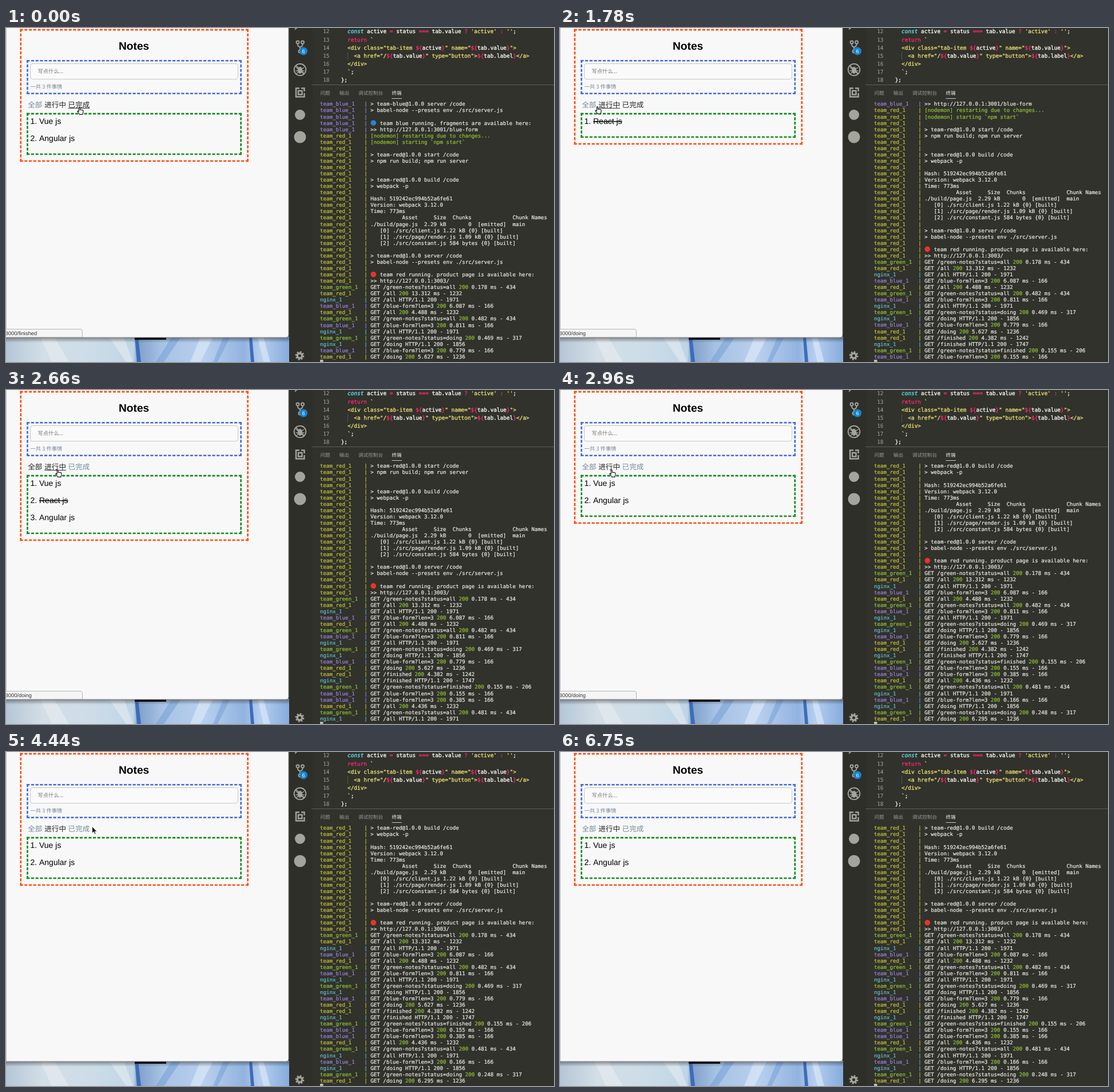
An HTML page for the animation above (6.85 s loop, 958 by 585 pixels).

```html
<!DOCTYPE html>
<html lang="zh">
<head>
<meta charset="utf-8">
<title>Notes</title>
<style>
html, body { margin: 0; width: 100%; height: 100%; overflow: hidden; background: #31322b; }
svg { display: block; }
text { white-space: pre; text-rendering: geometricPrecision; }
.sans { font-family: "Liberation Sans", Arial, sans-serif; }
.cjk { font-family: "Noto Sans CJK SC", "Noto Sans CJK", sans-serif; }
.mono { font-family: "DejaVu Sans Mono", monospace; fill: currentColor; stroke: currentColor; }
.mono tspan { fill: currentColor; stroke: currentColor; }
#code { font-size: 9.43px; color: #f8f8f2; stroke-width: .35px; }
#nums { font-size: 9.43px; color: #9a9a93; stroke-width: .1px; }
#code .p { color: #f92672; }
#code .y { color: #e6db74; }
#code .c { color: #66d9ef; font-style: italic; }
#rows { font-size: 9.17px; color: #ecece6; stroke-width: .22px; }
#rows text { fill: currentColor; stroke: currentColor; }
#rows .B { color: #9a80dc; }
#rows .R { color: #c3c23c; }
#rows .G { color: #93c13a; }
#rows .N { color: #64bccd; }
#tabs { font-size: 12.6px; }
#items { font-size: 14px; fill: #000; }
#icons { fill: none; stroke: #a3a49c; stroke-width: 1.9; }
</style>
</head>
<body>
<svg width="958" height="585" viewBox="0 0 958 585">
  <defs>
    <linearGradient id="sky">
      <stop offset="0" stop-color="#b4c6d6"/><stop offset=".13" stop-color="#d3dee6"/>
      <stop offset=".3" stop-color="#cddde8"/><stop offset=".45" stop-color="#bfd5e6"/>
      <stop offset=".465" stop-color="#7f9fcb"/><stop offset=".55" stop-color="#a6c2e4"/>
      <stop offset=".7" stop-color="#b9d0ee"/><stop offset=".84" stop-color="#92b3e0"/>
      <stop offset=".9" stop-color="#b5cff0"/><stop offset="1" stop-color="#86abdc"/>
    </linearGradient>
    <linearGradient id="shade" x2="0" y2="1">
      <stop offset="0" stop-color="#333" stop-opacity=".5"/><stop offset="1" stop-color="#333" stop-opacity="0"/>
    </linearGradient>
    <clipPath id="term"><rect x="536" y="128" width="422" height="453"/></clipPath>
  </defs>

  <rect width="958" height="585" fill="#31322b"/>
  <rect x="494" width="42" height="585" fill="#2e2f29"/>

  <!-- desktop -->
  <rect y="541" width="495" height="44" fill="url(#sky)"/>
  <path d="M60 541L80 585H110L84 541zM180 541L210 585H222L206 541z" fill="#eef2f4" opacity=".5"/>
  <path d="M225 541H231L236 585H229zM425 541H430L434 585H428z" fill="#3d6cb8"/>
  <path d="M290 541L262 585H276L306 541zM380 541L362 585H370L392 541z" fill="#5b8acb" opacity=".35"/>
  <path d="M340 541L322 585H340L362 541zM440 541L450 585H462L450 541z" fill="#e1edfb" opacity=".6"/>
  <rect y="542" width="495" height="9" fill="url(#shade)"/>
  <rect x="225" y="541" width="55" height="5" fill="#0c0d10"/>

  <!-- browser page -->
  <path d="M0-2H494V538Q494 542 490 542H0z" fill="#f8f8f8" stroke="#85878a" stroke-width="1"/>
  <g id="boxes" fill="none" stroke-width="2.6"></g>
  <text class="sans" x="223.6" y="38" font-size="19.2" font-weight="700" text-anchor="middle">Notes</text>
  <rect x="42.5" y="62.5" width="363" height="27.2" rx="4" fill="#fafafa" stroke="#c6c6c6"/>
  <text class="cjk" x="55.5" y="79.3" font-size="9.3" fill="#757575">写点什么...</text>
  <text class="cjk" x="42.5" y="106.4" font-size="9.3" fill="#778899">一共 3 件事情</text>
  <g id="tabs" class="cjk"></g>
  <g id="items" class="sans"></g>
  <g id="bubble">
    <path d="M-2 527.5H130Q133.5 527.5 133.5 531V541.5H-2z" fill="#f5f5f5" stroke="#b4b4b4"/>
    <text id="link" class="sans" x="-1.5" y="537.7" font-size="9.4" fill="#333"></text>
  </g>

  <!-- activity bar -->
  <g id="icons">
    <path d="M505 2.5L509-1M510 27V29Q510 32 514 33.5Q518.5 32 518.5 29V27M514 33V39"/>
    <circle cx="510" cy="25" r="2.5"/><circle cx="518.5" cy="25" r="2.5"/><circle cx="514" cy="41" r="2.5"/>
    <circle cx="520" cy="40.5" r="7" fill="#1385d0" stroke="none"/>
    <circle cx="514" cy="73" r="10.3"/>
    <ellipse cx="514" cy="74" rx="3.2" ry="5" fill="#a3a49c"/>
    <path d="M507 69L511 72M506.5 75H511M508 80L511 77M521 69L517 72M521.5 75H517M520 80L517 77" stroke-width="1.3"/>
    <path d="M507 66L521 80"/>
    <path d="M513 105.5H507V120.5H521.5V114M516 105.5H521.5V111M511 110H517.5V116.5H511z" stroke-width="2.4"/>
    <circle cx="514" cy="152" r="9" fill="#a3a49c" stroke="none"/>
    <circle cx="514" cy="191" r="10.5" fill="#a3a49c" stroke="none"/>
    <circle cx="513.5" cy="574" r="4.2" stroke-width="3.4"/>
    <circle cx="513.5" cy="574" r="6.6" stroke-width="2.6" stroke-dasharray="2.7 2.484"/>
  </g>
  <text class="sans" x="520" y="43.8" font-size="9" fill="#fff" text-anchor="middle">6</text>

  <!-- editor -->
  <g id="nums" class="mono"></g>
  <path d="M597.5 42V56" stroke="#54554d"/>
  <g id="code" class="mono">
    <text><tspan class="c">const</tspan> active <tspan class="p">=</tspan> status <tspan class="p">===</tspan> tab.value <tspan class="p">?</tspan> <tspan class="y">'active'</tspan> <tspan class="p">:</tspan> <tspan class="y">''</tspan>;</text>
    <text><tspan class="p">return</tspan> <tspan class="y">`</tspan></text>
    <text class="tpl">&lt;div class="tab-item ${active}" name="${tab.value}"&gt;</text>
    <text class="tpl">  &lt;a href="/${tab.value}" type="button"&gt;${tab.label}&lt;/a&gt;</text>
    <text class="tpl">&lt;/div&gt;</text>
    <text><tspan class="y">`</tspan>;</text>
    <text>};</text>
  </g>

  <!-- panel -->
  <path d="M534 99.5H958" stroke="#5c5d55"/>
  <g class="cjk" font-size="8.6" fill="#9a9b93">
    <text x="549.5" y="117.2">问题</text><text x="582.8" y="117.2">输出</text>
    <text x="616" y="117.2">调试控制台</text>
    <text x="674.5" y="117.2" fill="#f2f2ee" font-weight="500">终端</text>
  </g>
  <path d="M674.5 123.5H692" stroke="#c9c9c2"/>
  <g clip-path="url(#term)"><g id="rows" class="mono"></g></g>
  <rect x="549" y="581" width="5.5" height="4" fill="#b9bab3"/>

  <!-- pointers -->
  <g id="pointer">
    <path id="hand" fill="#fff" stroke="#111" stroke-width="1.1" d="M3.2 8.2V1.6Q4.2 .2 5.2 1.6V5.4Q6.4 4.6 7.2 5.6Q8.4 4.9 9.2 6Q10.8 5.6 11 7L10.8 10Q10 12 9.8 13.4H4.6Q4 11.8 2.4 10.4L.8 8Q1.4 6.6 3.2 8.2z"/>
    <path id="arrow" fill="#111" stroke="#fff" stroke-width=".9" d="M.5.5V12.5L3.4 9.8L5.2 14L7.2 13.2L5.4 9.2H9z"/>
    <path id="beam" fill="none" stroke="#dcdcd6" stroke-width="1.2" d="M1.5.6Q4.5.6 4.5 2.5Q4.5.6 7.5.6M4.5 2V12M1.5 13.4Q4.5 13.4 4.5 11.5Q4.5 13.4 7.5 13.4"/>
  </g>
</svg>

<script type="text/plain" id="log">
B> team-blue@1.0.0 server /code
B> babel-node --presets env ./src/server.js
B
B@#2f7fd6 team blue running. fragments are available here:
B>> http://127.0.0.1:3001/blue-form
R[nodemon] restarting due to changes...
R[nodemon] starting `npm start`
R
R> team-red@1.0.0 start /code
R> npm run build; npm run server
R
R
R> team-red@1.0.0 build /code
R> webpack -p
R
RHash: 519242ec994b52a6fe61
RVersion: webpack 3.12.0
RTime: 773ms
R          Asset     Size  Chunks             Chunk Names
R./build/page.js  2.29 kB       0  [emitted]  main
R   [0] ./src/client.js 1.22 kB {0} [built]
R   [1] ./src/page/render.js 1.09 kB {0} [built]
R   [2] ./src/constant.js 584 bytes {0} [built]
R
R> team-red@1.0.0 server /code
R> babel-node --presets env ./src/server.js
R
R@#e8352b team red running. product page is available here:
R>> http://127.0.0.1:3003/
GGET /green-notes?status=all 200 0.178 ms - 434
RGET /all 200 13.312 ms - 1232
NGET /all HTTP/1.1 200 - 1971
BGET /blue-form?len=3 200 6.087 ms - 166
RGET /all 200 4.488 ms - 1232
GGET /green-notes?status=all 200 0.482 ms - 434
BGET /blue-form?len=3 200 0.811 ms - 166
NGET /all HTTP/1.1 200 - 1971
GGET /green-notes?status=doing 200 0.469 ms - 317
NGET /doing HTTP/1.1 200 - 1856
BGET /blue-form?len=3 200 0.779 ms - 166
RGET /doing 200 5.627 ms - 1236
RGET /finished 200 4.382 ms - 1242
NGET /finished HTTP/1.1 200 - 1747
GGET /green-notes?status=finished 200 0.155 ms - 206
BGET /blue-form?len=3 200 0.155 ms - 166
BGET /blue-form?len=3 200 0.385 ms - 166
RGET /all 200 4.436 ms - 1232
GGET /green-notes?status=all 200 0.481 ms - 434
NGET /all HTTP/1.1 200 - 1971
BGET /blue-form?len=3 200 0.166 ms - 166
NGET /doing HTTP/1.1 200 - 1856
GGET /green-notes?status=doing 200 0.248 ms - 317
RGET /doing 200 6.295 ms - 1236
</script>

<script>
const $ = id => document.getElementById(id);
const LOOP = 6850, ROW = 11.06, COL = 5.52, LINE = 14.15;

// editor
document.querySelectorAll('#code text').forEach((el, i) => {
  const y = 9.4 + i * LINE;
  el.setAttribute('x', i === 6 ? 585.7 : 597);
  el.setAttribute('y', y);
  if (el.matches('.tpl')) {
    el.innerHTML = '<tspan class="y">' + el.innerHTML.replace(/\$\{(.*?)\}/g,
      '</tspan><tspan class="p">${</tspan>$1<tspan class="p">}</tspan><tspan class="y">') + '</tspan>';
  }
  $('nums').innerHTML += `<text x="565.5" y="${y}" text-anchor="end">${12 + i}</text>`;
});

// terminal
const services = { B: 'team_blue_1', R: 'team_red_1', G: 'team_green_1', N: 'nginx_1' };
const escapeText = s => s.replace(/&/g, '&amp;').replace(/</g, '&lt;').replace(/>/g, '&gt;');

function logRow(line, i) {
  const key = line[0], y = 136.4 + i * ROW, x = 549 + 16 * COL;
  let dot = '';
  const body = escapeText(line.slice(1))
    .replace(/^@(#\w+) /, (m, color) => {
      dot = `<circle cx="642.3" cy="${y - 3.4}" r="4.8" fill="${color}" stroke="none"/>`;
      return '   ';
    })
    .replace(/ 200 (?=[\d.]+ ms)/, ' <tspan class="G">200</tspan> ')
    .replace(/^\[nodemon\].*/, '<tspan class="G">$&</tspan>');
  return `<text class="${key}" x="549" y="${y}">${services[key].padEnd(14)}|</text>` +
         `<text x="${x}" y="${y}">${body}</text>${dot}`;
}
$('rows').innerHTML = $('log').textContent.replace(/^\n|\n$/g, '').split('\n').map(logRow).join('');

// dashed boxes: every edge starts and ends with a full dash
function edge(x1, y1, x2, y2) {
  const w = 2.6, len = Math.hypot(x2 - x1, y2 - y1);
  const n = Math.round((len / w + 1) / 3);
  const gap = (len - n * 2 * w) / (n - 1);
  return `<path d="M${x1} ${y1}L${x2} ${y2}" stroke-dasharray="${2 * w} ${gap}"/>`;
}
function box(x1, y1, x2, y2, color) {
  const h = 1.3;
  return `<g stroke="${color}">` + edge(x1, y1 + h, x2, y1 + h) + edge(x1, y2 - h, x2, y2 - h) +
    edge(x1 + h, y1, x1 + h, y2) + edge(x2 - h, y1, x2 - h, y2) + '</g>';
}

// notes page
const tabs = [['all', '全部', 38.2], ['doing', '进行中', 67.2], ['finished', '已完成', 108.6]];
const notes = [['Vue js', false], ['React js', true], ['Angular js', false]];

function drawPage(page, hover) {
  const list = notes.filter(n => page === 'all' || n[1] === (page === 'finished'));
  const grow = list.length * 30;
  $('boxes').innerHTML = box(24.5, 1.8, 424, 174.3 + grow, '#ff4a0f') +
    box(36.2, 56, 412, 116, '#4169e1') + box(36.2, 148.8, 412, 162.3 + grow, '#128a1c');
  $('items').innerHTML = list.map(([name, done], i) => {
    const y = 168.2 + i * 30;
    return `<text x="42.4" y="${y}">${i + 1}.</text>` +
      `<text x="58" y="${y}"${done ? ' text-decoration="line-through"' : ''}>${name}</text>`;
  }).join('');
  $('tabs').innerHTML = tabs.map(([key, label, x]) => {
    const dark = key === page || key === hover;
    const line = key === hover ? `<path d="M${x} 140.5h${label.length * 12.6}" stroke="#333"/>` : '';
    return `<text x="${x}" y="138.8" fill="${dark ? '#222' : '#778899'}">${label}</text>${line}`;
  }).join('');
}

// time, pointer x, y, shape, page, linked page, link underlined, scrolled rows
const A = 'all', D = 'doing', F = 'finished';
const steps = [
  [0, 124, 138, 'hand', D, F, 1, 0],
  [140, 127, 138, 'hand', D, F, 1, 0],
  [290, 129, 138.5, 'hand', D, F, 1, 0],
  [740, 129, 138.5, 'hand', F, F, 0, 4],
  [890, 128, 138.5, 'hand', F, F, 1, 4],
  [1040, 123, 138.5, 'hand', F, F, 1, 4],
  [1190, 113, 138, 'hand', F, F, 1, 4],
  [1330, 100, 138, 'hand', F, D, 1, 4],
  [1480, 86, 137.5, 'hand', F, D, 1, 4],
  [1630, 72, 137, 'hand', F, D, 1, 4],
  [1780, 61, 137, 'hand', F, D, 1, 4],
  [1930, 50, 138, 'hand', F, A, 1, 4],
  [2080, 46, 139, 'hand', F, A, 1, 4],
  [2230, 46, 139, 'hand', A, A, 0, 8],
  [2370, 55, 139, 'hand', A, A, 1, 8],
  [2520, 76, 139, 'hand', A, D, 1, 8],
  [2660, 86, 139, 'hand', A, D, 1, 8],
  [2960, 86, 139, 'hand', D, D, 0, 12],
  [3550, 86, 139, 'hand', D, '', 0, 12],
  [4300, 150, 130, 'arrow', D, '', 0, 12],
  [4450, 330, 180, 'arrow', D, '', 0, 12],
  [4600, 545, 300, 'beam', D, '', 0, 12],
  [4750, 655, 400, 'beam', D, '', 0, 12],
  [4890, 697, 445, 'beam', D, '', 0, 12],
  [5190, 850, 525, 'beam', D, '', 0, 12],
  [5340, 903, 558, 'beam', D, '', 0, 12],
  [5630, 903, 574, 'beam', D, '', 0, 12],
  [5780, 0, 0, '', D, '', 0, 12]
];

let shown;
function frame(now) {
  const step = steps.findLast(s => s[0] <= now % LOOP);
  if (step !== shown) {
    shown = step;
    const [, x, y, shape, page, link, underlined, scroll] = step;
    drawPage(page, underlined ? link : '');
    $('pointer').setAttribute('transform', `translate(${x} ${y})`);
    for (const id of ['hand', 'arrow', 'beam']) $(id).style.display = id === shape ? '' : 'none';
    $('bubble').style.display = link ? '' : 'none';
    $('link').textContent = '3000/' + link;
    $('rows').setAttribute('transform', `translate(0 ${-scroll * ROW})`);
  }
  requestAnimationFrame(frame);
}
frame(0);
</script>
</body>
</html>
```
